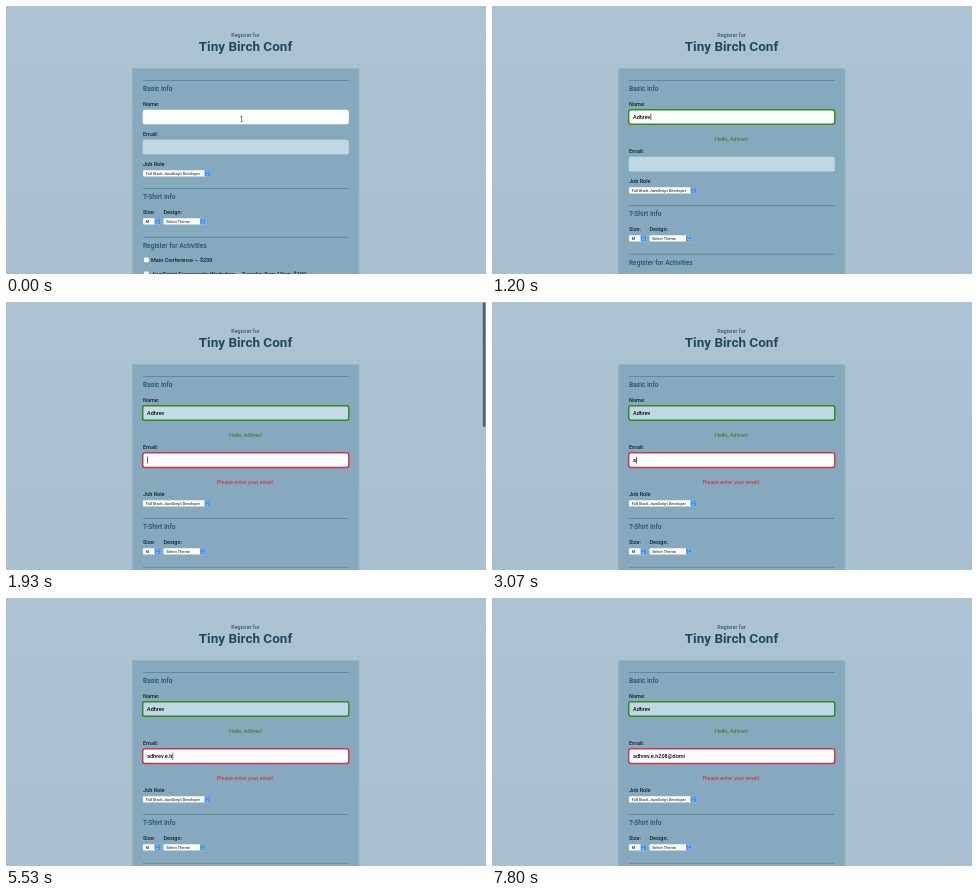
An HTML page with a canvas for the animation above (8000 ms loop, 480 by 268 pixels).

```html
<!DOCTYPE html>
<html lang="en">
<head>
<meta charset="utf-8">
<title>Registration form</title>
<style>
  html, body { margin: 0; width: 100%; height: 100%; overflow: hidden; background: #aac2d0; }
  canvas { display: block; width: 480px; height: 268px; }
</style>
</head>
<body>
<canvas id="stage" width="480" height="268"></canvas>
<script>
const ctx = document.getElementById('stage').getContext('2d');
const LOOP = 8000;
const LEFT = 137, WIDTH = 205.5, CENTER = 239.5, ROW = 17;
const FONT = 'Roboto, Arial, sans-serif';
const INK = '#10242e', HEADING = '#23526a';
const GREEN = '#388a12', RED = '#cf3548';
const PALE = [192, 216, 230], WHITE = [255, 255, 255];

const NAME = 'Adhrev';
const EMAIL = 'adhrev.e.h208@domi';
const nameKeys = [470, 670, 800, 870, 1000, 1130];
const emailKeys = [3070, 3200, 3270, 3400, 3470, 3600, 4870, 5070, 5470,
  5530, 5930, 6130, 6400, 6600, 7200, 7330, 7470, 7530];
const greetAt = 470, emailFocusAt = 1530;
const caretGaps = [[2670, 3070], [4200, 4730], [7800, 8000]];

const clamp = v => Math.max(0, Math.min(1, v));
const typed = (word, keys, t) => word.slice(0, keys.filter(k => k <= t).length);
const mix = (a, b, p) => `rgb(${a.map((v, i) => Math.round(v + (b[i] - v) * p))})`;

function box(x, y, w, h, r, fill) {
  ctx.beginPath();
  ctx.roundRect(x, y, w, h, r);
  ctx.fillStyle = fill;
  ctx.fill();
}

function text(str, x, y, size, { weight = 400, color = INK, align = 'left' } = {}) {
  ctx.font = `${weight} ${size}px ${FONT}`;
  ctx.textAlign = align;
  ctx.fillStyle = color;
  ctx.fillText(str, x, y);
  return ctx.measureText(str).width;
}

const label = (str, x, y) => text(str, x, y, 5.5, { weight: 500 });

function section(title, y) {
  ctx.fillStyle = '#62899c';
  ctx.fillRect(LEFT, y, WIDTH, 1);
  text(title, LEFT, y + 10.8, 6.6, { weight: 500, color: HEADING });
}

function field(y, value, fill, border, caret) {
  box(LEFT - 0.3, y, WIDTH + 0.6, 14.6, 2.2, fill);
  if (border) {
    ctx.strokeStyle = border;
    ctx.lineWidth = 1.5;
    ctx.stroke();
  }
  const w = text(value, 141, y + 9.3, 5.5, { weight: 500, color: '#05090b' });
  if (caret) {
    ctx.fillStyle = '#222';
    ctx.fillRect(141.2 + w, y + 4, 0.7, 6.6);
  }
}

function select(x, y, w, value) {
  box(x, y, w, 6.2, 1, '#fafcfd');
  box(x + w - 5.4, y, 5.4, 6.2, 1, '#3f8df0');
  text(value, x + 2.7, y + 4.5, 3.9, { color: '#111' });
  ctx.strokeStyle = '#fff';
  ctx.lineWidth = 0.6;
  ctx.beginPath();
  for (const d of [-1, 1]) {
    const cy = y + 3.1 + d * 0.7;
    ctx.moveTo(x + w - 3.9, cy);
    ctx.lineTo(x + w - 2.7, cy + d * 1.2);
    ctx.lineTo(x + w - 1.5, cy);
  }
  ctx.stroke();
}

function activity(str, y) {
  box(138, y - 4.5, 4.8, 4.8, 1, '#f6f9fb');
  label(str, 145, y);
}

function pointer(x, y) {
  ctx.strokeStyle = '#555';
  ctx.lineWidth = 0.7;
  ctx.beginPath();
  ctx.moveTo(x, y - 2.5);
  ctx.lineTo(x, y + 2.5);
  for (const d of [-2.7, 2.7]) {
    ctx.moveTo(x - 1.2, y + d);
    ctx.lineTo(x + 1.2, y + d);
  }
  ctx.stroke();
}

// The overlay bar flashes on each layout change, then fades.
function scrollbar(t, start, height, hold) {
  if (t < start) return;
  ctx.globalAlpha = 1 - clamp((t - start - hold) / 220);
  box(476.8, 0.5, 2.7, height, 1.3, '#4d606c');
  ctx.globalAlpha = 1;
}

function page() {
  const sky = ctx.createLinearGradient(0, 0, 0, 268);
  sky.addColorStop(0, '#acc4d1');
  sky.addColorStop(1, '#a8c0cf');
  ctx.fillStyle = sky;
  ctx.fillRect(0, 0, 480, 268);
  text('Register for', CENTER, 31, 5.5, { color: '#1c4258', align: 'center' });
  text('Tiny Birch Conf', CENTER, 45.2, 13.5, { weight: 700, color: '#20495f', align: 'center' });
  box(126, 62, 227.5, 220, 1, '#94b3c2');
  box(127, 63, 225.5, 220, 0.5, '#86a9be');
}

function draw(t) {
  const greeted = t >= greetAt;
  const onEmail = t >= emailFocusAt;
  const blend = 1 - (1 - clamp((t - emailFocusAt) / 550)) ** 2;
  const caret = !caretGaps.some(([a, b]) => t >= a && t < b);
  const name = typed(NAME, nameKeys, t);

  page();
  section('Basic Info', 74);
  label('Name:', LEFT, 99.5);
  field(103.7, name, mix(WHITE, PALE, blend), greeted && GREEN, greeted && !onEmail);
  if (!greeted) pointer(235.5, 113);

  let shift = 0;
  if (greeted) {
    text(`Hello, ${name}!`, CENTER, 135, 5.4, { color: '#2c7a10', align: 'center' });
    shift += ROW;
  }

  label('Email:', LEFT, 129.7 + shift);
  field(133.8 + shift, typed(EMAIL, emailKeys, t), mix(PALE, WHITE, blend),
    onEmail && RED, onEmail && caret);
  if (onEmail) {
    text('Please enter your email.', CENTER, 182, 5.4, { color: '#e41c34', align: 'center' });
    shift += ROW;
  }

  label('Job Role', LEFT, 159.5 + shift);
  select(LEFT, 164.2 + shift, 67, 'Full Stack JavaScript Developer');

  section('T-Shirt Info', 182 + shift);
  label('Size:', LEFT, 207.5 + shift);
  label('Design:', 157.5, 207.5 + shift);
  select(LEFT, 212.3 + shift, 17, 'M');
  select(157.5, 212.3 + shift, 42, 'Select Theme');

  section('Register for Activities', 230.8 + shift);
  activity('Main Conference — $200', 256 + shift);
  activity('JavaScript Frameworks Workshop — Tuesday 9am-12pm, $100', 270 + shift);

  if (onEmail) scrollbar(t, emailFocusAt, 124.5, 450);
  else scrollbar(t, greetAt, 128.5, 450);
}

function tick(now) {
  draw(now % LOOP);
  requestAnimationFrame(tick);
}
draw(0);
requestAnimationFrame(tick);
</script>
</body>
</html>
```
